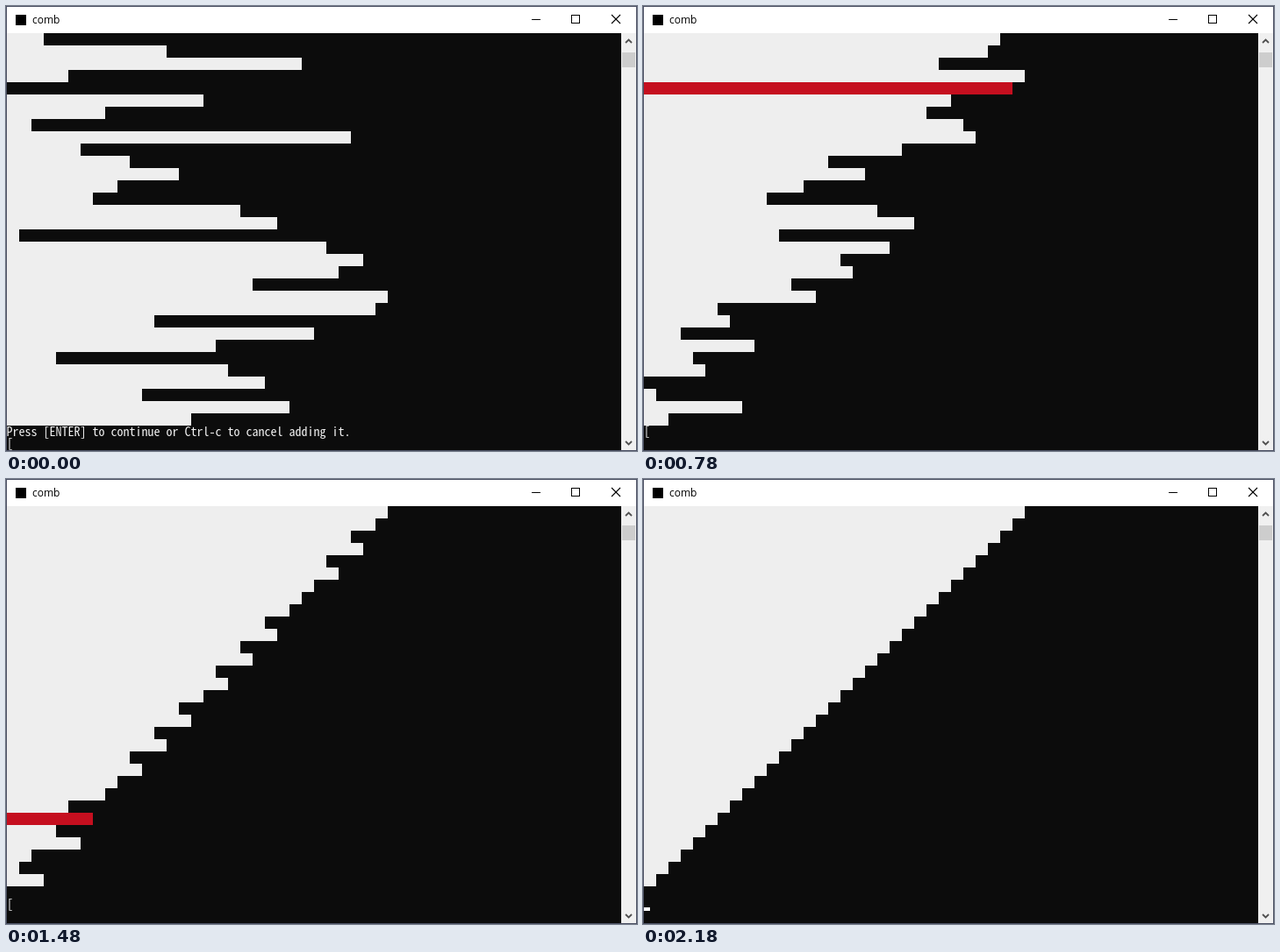
Animation, 719 px wide and 508 px high, one loop 2360 ms. Source, as an HTML page with a canvas:

```html
<!DOCTYPE html>
<html lang="en">
<head>
<meta charset="utf-8">
<title>Comb sort</title>
<style>
  html, body { margin: 0; width: 100%; height: 100%; overflow: hidden; background: #0c0c0c; }
  canvas { display: block; }
</style>
</head>
<body>
<canvas id="stage" width="719" height="508"></canvas>
<script>
const ctx = document.getElementById('stage').getContext('2d');
const LOOP = 2360, START = 300, SORT_END = 2160, PROMPT = 2180;
const CELL = 14, TOP = 31;
const BLACK = '#0c0c0c', BAR = '#eee', RED = '#c50f1f', BORDER = '#4a4f63';
const MONO = '"Noto Sans Mono CJK JP", "Noto Sans Mono", monospace';
const VALUES = [3, 13, 24, 5, 0, 16, 8, 2, 28, 6, 10, 14, 9, 7, 19, 22,
  1, 26, 29, 27, 20, 31, 30, 12, 25, 17, 4, 18, 21, 11, 23, 15];

// Console cells are 7 px wide, so pick the size that gives this advance.
ctx.font = `100px ${MONO}`;
const monoFont = `${700 / ctx.measureText('M').width}px ${MONO}`;

function rect(color, x, y, w, h) {
  ctx.fillStyle = color;
  ctx.fillRect(x, y, w, h);
}

function text(str, x, y, font, color) {
  ctx.font = font;
  ctx.fillStyle = color;
  ctx.fillText(str, x, y);
}

function line(color, width, ...points) {
  ctx.strokeStyle = color;
  ctx.lineWidth = width;
  ctx.beginPath();
  for (const [x, y] of points) ctx.lineTo(x, y);
  ctx.stroke();
}

// Descending comb sort, stopped after a number of comparisons.
function combSort(limit) {
  const a = [...VALUES];
  let gap = a.length, count = 0, swapped = true;
  if (limit < 1) return { a, row: -1 };
  while (gap > 1 || swapped) {
    gap = Math.max(1, Math.floor(gap / 1.3));
    swapped = false;
    for (let i = 0; i + gap < a.length; i++) {
      if (a[i] < a[i + gap]) {
        [a[i], a[i + gap]] = [a[i + gap], a[i]];
        swapped = true;
      }
      if (++count === limit) return { a, row: i };
    }
  }
  return { a, row: -1 };
}

function drawWindow() {
  rect(BORDER, 0, 0, 719, 508);
  rect('#fff', 1, 1, 717, 30);
  rect(BLACK, 1, TOP, 700, 476);
  rect('#000', 11, 10, 12, 12);
  text('comb', 30, 20, '12px "Open Sans", "Noto Sans", sans-serif', '#000');

  rect('#000', 599, 15, 10, 1);
  ctx.strokeStyle = '#000';
  ctx.lineWidth = 1;
  ctx.strokeRect(644.5, 10.5, 9, 9);
  line('#000', 1.1, [690, 10], [700, 20]);
  line('#000', 1.1, [700, 10], [690, 20]);

  rect('#f0f0f0', 701, TOP, 17, 476);
  rect('#cdcdcd', 702, 53, 15, 17);
  line('#505050', 1.8, [706, 42], [709.5, 38.5], [713, 42]);
  line('#505050', 1.8, [706, 497], [709.5, 500.5], [713, 497]);
}

function draw(now) {
  const t = Math.floor((now % LOOP) / 20) * 20;
  const steps = t < START ? 0
    : t < SORT_END ? Math.max(0, Math.floor(13.72 + 0.1454 * (t - 400)))
    : Infinity;
  const { a, row } = combSort(steps);

  drawWindow();
  a.forEach((v, i) => rect(i === row ? RED : BAR, 1, TOP + i * CELL, v * CELL, CELL));

  if (t < START) {
    text('Press [ENTER] to continue or Ctrl-c to cancel adding it.', 0.5, 491, monoFont, '#f2f2f2');
    text('[', 1, 504, monoFont, '#f2f2f2');
  } else if (t < PROMPT) {
    text('[', 1, 490, monoFont, '#f2f2f2');
  } else {
    rect('#fff', 1, 489, 7, 4);
  }
}

const origin = performance.now();
function tick() {
  draw(performance.now() - origin);
  requestAnimationFrame(tick);
}
tick();
</script>
</body>
</html>
```
